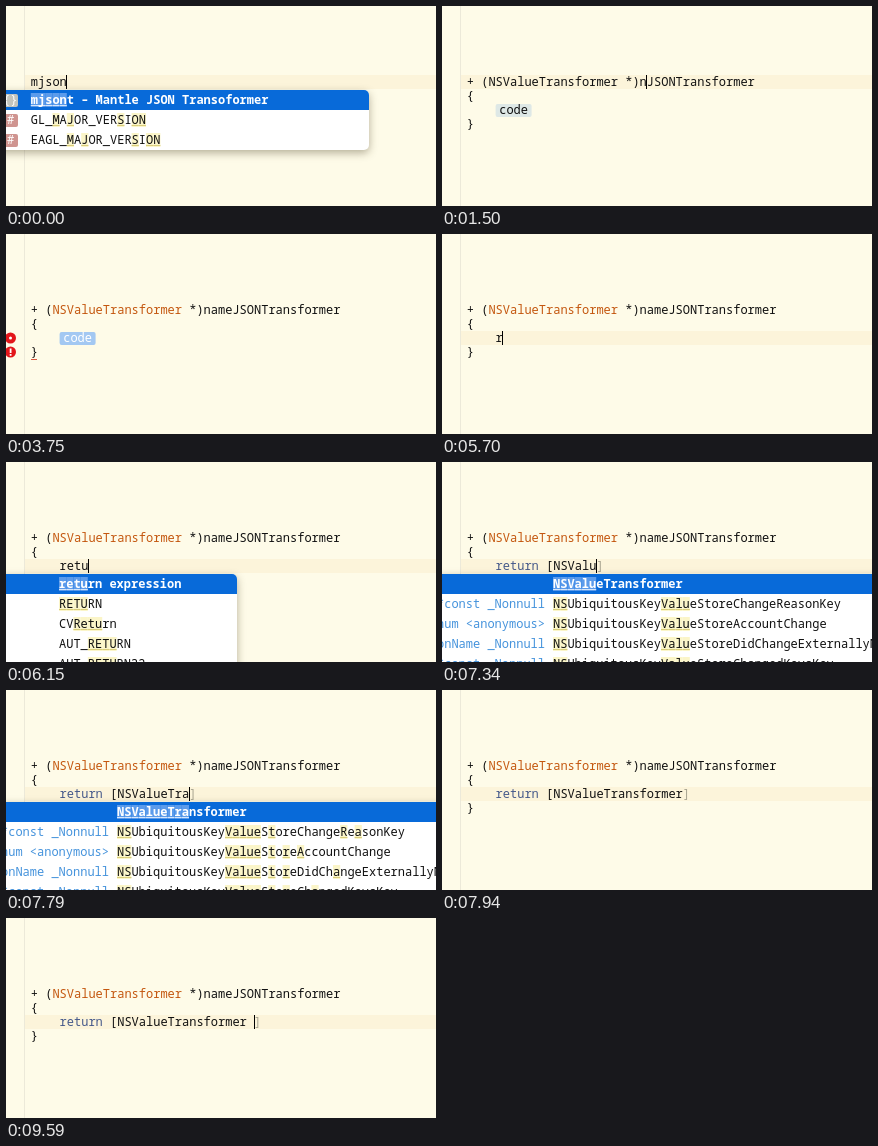
These frames come from a looping animation (430x200 px, 9.69 s). An HTML page with a canvas:

```html
<!DOCTYPE html>
<html lang="en">
<head>
<meta charset="utf-8">
<title>Code completion</title>
<style>
html, body { margin: 0; width: 100%; height: 100%; overflow: hidden; background: #fefbe8; }
canvas { display: block; }
</style>
</head>
<body>
<canvas id="stage" width="430" height="200"></canvas>
<script>
const ctx = document.getElementById('stage').getContext('2d');
const LOOP = 9690, CHAR = 7.2, LEFT = 24.8, LINE = 14, TOP = 69;
const INK = '#111', ORANGE = '#c4570f', SLATE = '#45598a', FADED = '#aaa692';

const names = [[0, ''], [1500, 'n'], [1650, 'na'], [1800, 'name']];
const bodies = [
  [0, ''], [5700, 'r'], [6000, 'ret'], [6150, 'retu'], [6300, 'return '], [6450, 'return ['],
  [6740, 'return [NS'], [7040, 'return [NSVa'], [7190, 'return [NSVal'], [7340, 'return [NSValu'],
  [7490, 'return [NSValue'], [7640, 'return [NSValueT'], [7790, 'return [NSValueTra'],
  [7940, 'return [NSValueTransformer'], [8540, 'return [NSValueTransformer ']
];
const popups = [
  { from: 0, to: 300, y: 84, right: 363, x: LEFT, icons: ['{}', '#', '#'],
    rows: ['mjsont – Mantle JSON Transoformer', 'GL_MAJOR_VERSION', 'EAGL_MAJOR_VERSION'] },
  { from: 6000, to: 6300, y: 112, right: 231, x: 53,
    rows: ['return expression', 'RETURN', 'CVReturn', 'AUT_RETURN', 'AUT_RETURN32'] },
  { from: 7190, to: 7940, y: 112, right: 450, x: 111,
    types: ['', '*const _Nonnull', 'enum <anonymous>', 'NotificationName _Nonnull', '*const _Nonnull'],
    rows: ['NSValueTransformer', 'NSUbiquitousKeyValueStoreChangeReasonKey',
      'NSUbiquitousKeyValueStoreAccountChange',
      'NSUbiquitousKeyValueStoreDidChangeExternallyNotification',
      'NSUbiquitousKeyValueStoreChangedKeysKey'] }
];

const at = (list, t) => list.filter(([start]) => start <= t).pop()[1];
const within = (t, a, b) => t >= a && t < b;
const colX = col => LEFT + col * CHAR;
const rowY = row => TOP + row * LINE;

function rect(x, y, w, h, color) {
  ctx.fillStyle = color;
  ctx.fillRect(x, y, w, h);
}

function round(x, y, w, h, r, color) {
  ctx.fillStyle = color;
  ctx.beginPath();
  ctx.roundRect(x, y, w, h, r);
  ctx.fill();
}

function text(str, x, baseline, color = INK, weight = 500) {
  ctx.font = `${weight} 12px "Noto Sans Mono", monospace`;
  ctx.fillStyle = color;
  ctx.fillText(str, x, baseline);
}

const code = (str, col, row, color) => text(str, colX(col), rowY(row) + 11, color);

function placeholder(str, col, row, selected) {
  round(colX(col), rowY(row) + 1, (str.length + 1) * CHAR, 13, 2, selected ? '#a3c8f2' : '#dee8e6');
  code(str, col + 0.5, row, selected ? '#fff' : INK);
}

const caret = (col, row) => rect(Math.round(colX(col) - 0.4), rowY(row), 1, LINE, '#000');

// Fuzzy match: the adjacent letter first, then a later capital, then any later letter.
function matches(str, query) {
  const found = [];
  let last = -1;
  for (const c of query) {
    const upper = c.toUpperCase(), lower = c.toLowerCase(), next = last + 1;
    if ((str[next] || '').toLowerCase() === lower) last = next;
    else {
      const capital = str.indexOf(upper, next);
      last = capital >= 0 ? capital : str.indexOf(lower, next);
    }
    if (last < 0) break;
    found.push(last);
  }
  return found;
}

function drawPopup({ y, right, x, rows, icons, types }, query) {
  const h = rows.length * 20;
  ctx.save();
  ctx.shadowColor = 'rgba(70, 60, 30, 0.4)';
  ctx.shadowBlur = 9;
  ctx.shadowOffsetY = 3;
  round(-20, y, right + 20, h, 5, '#fff');
  ctx.restore();
  round(-20, y, right + 20, 20, [0, 5, 0, 0], '#086ad9');

  rows.forEach((label, i) => {
    const top = y + i * 20, selected = i === 0;
    for (const m of matches(label, query)) {
      const mx = x + m * CHAR;
      rect(mx, top + 3, CHAR, 14, selected ? '#5b9beb' : '#fbf5c8');
      rect(mx, top + 15, CHAR, 1, selected ? '#d5e6fb' : '#d9cd7c');
    }
    text(label, x, top + 14, selected ? '#fff' : INK, selected ? 700 : 500);
    if (types) text(types[i], 103 - types[i].length * CHAR, top + 14, '#4593dc', 400);
    if (icons) {
      round(-3, top + 4, 15, 13, 2, selected ? '#c3c4bd' : '#cf9490');
      text(icons[i], icons[i].length > 1 ? -3 : 1, top + 14, '#fff');
    }
  });
}

function errorBadge(row) {
  ctx.fillStyle = '#e3151a';
  ctx.beginPath();
  ctx.arc(4.5, rowY(row) + 7, 5.5, 0, 7);
  ctx.fill();
}

function drawErrors() {
  errorBadge(2);
  round(3, rowY(2) + 5.5, 3, 3, 1.5, '#fff');
  errorBadge(3);
  rect(3.7, rowY(3) + 3.5, 1.8, 4.5, '#fff');
  rect(3.7, rowY(3) + 9, 1.8, 1.8, '#fff');
  rect(25, 125, 6, 1, '#d9573f');
}

function drawMethod(t, name, body) {
  const typed = t >= 2400;
  code('+ (', 0, 0);
  code('NSValueTransformer', 3, 0, typed ? ORANGE : INK);
  code(' *)', 21, 0);
  if (name) code(name, 24, 0);
  else placeholder('key', 24, 0, t >= 450);
  code('JSONTransformer', 24 + (name.length || 4), 0);
  code('{', 0, 1);
  code('}', 0, 3);

  if (!body) placeholder('code', 4, 2, t >= 2100);
  else if (body.startsWith('return')) {
    code('return', 4, 2, SLATE);
    code(body.slice(6), 10, 2);
    if (body.includes('[')) code(']', 4 + body.length, 2, FADED);
  } else code(body, 4, 2);
}

function draw(t) {
  const name = at(names, t), body = at(bodies, t);
  const expanded = t >= 300;
  const activeRow = t < 2100 ? 0 : t >= 5700 ? 2 : -1;

  rect(0, 0, 430, 200, '#fefbe8');
  if (within(t, 6450, 7190)) rect(0, 97, 18, 103, '#f5f2e1');
  if (activeRow >= 0) rect(19, rowY(activeRow), 411, LINE, '#fcf4da');
  rect(18, 0, 1, 200, '#ece9d9');

  if (expanded) drawMethod(t, name, body);
  else code('mjson', 0, 0);
  if (within(t, 3750, 5700)) drawErrors();

  const popup = popups.find(p => within(t, p.from, p.to));
  if (popup) drawPopup(popup, expanded ? body.split('[').pop() : 'mjson');

  if (!expanded) caret(5, 0);
  else if (within(t, 1500, 2100)) caret(24 + name.length, 0);
  else if (body && !within(t, 7940, 8540) && !within(t, 9140, 9590)) caret(4 + body.length, 2);
}

const start = performance.now();
function tick() {
  draw((performance.now() - start) % LOOP);
  requestAnimationFrame(tick);
}
tick();
</script>
</body>
</html>
```
